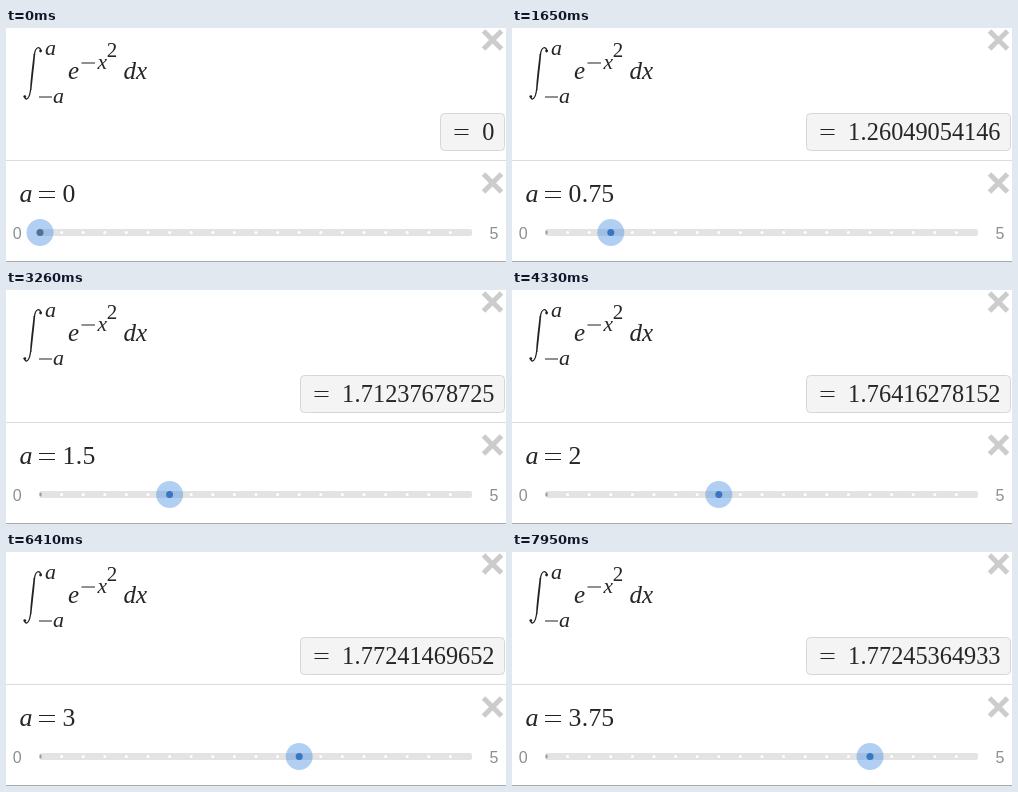
Write an HTML page that moves like this. It is 500 px wide and 234 px high and loops after 8 s.

```html
<!DOCTYPE html>
<html lang="en">
<head>
<meta charset="utf-8">
<title>Integral with slider</title>
<style>
html, body { margin: 0; width: 100%; height: 100%; overflow: hidden; background: #fff; }
svg { display: block; width: 500px; height: 234px; }
.math { font-family: "Liberation Serif", "Times New Roman", serif; fill: #262626; }
.var { font-style: italic; }
.end { font: 16px "Liberation Sans", Arial, sans-serif; fill: #8c8f92; }
.rule { stroke: #222; stroke-width: 1.2; fill: none; }
.close { stroke: #ccc; stroke-width: 5; }
</style>
</head>
<body>
<svg viewBox="0 0 500 234">
  <path d="M0 132.5H500" stroke="#dcdcdc"/>
  <path d="M0 233.5H500" stroke="#aaa"/>
  <path class="close" d="M477.5 3L495.5 21M495.5 3L477.5 21M477.5 146L495.5 164M495.5 146L477.5 164"/>

  <!-- integral sign -->
  <g transform="translate(0 1)">
    <path fill="none" stroke="#222" stroke-width="1.3" d="M35 22C34 17 29.5 17 28.3 26M24.7 60C23.5 70 20 72.5 18.3 67.5"/>
    <path fill="#222" d="M27.6 25L29.2 25Q28.5 34 27.3 44Q26.2 54 25.4 61L24 61Q24.4 53 25.4 44Q26.6 34 27.6 25Z"/>
    <circle cx="34.6" cy="22" r="1.4" fill="#222"/>
    <circle cx="18.8" cy="67.6" r="1.4" fill="#222"/>
  </g>

  <g class="math var">
    <text x="39" y="27" font-size="22">a</text>
    <text x="47" y="75" font-size="22">a</text>
    <text x="62" y="51" font-size="25">e</text>
    <text x="91.5" y="40.5" font-size="21.5">x</text>
    <text x="117.5" y="51" font-size="25">dx</text>
    <text x="13.5" y="174" font-size="26">a</text>
  </g>
  <text class="math" x="100.7" y="28.5" font-size="21">2</text>
  <path class="rule" d="M75.5 35H89M33 69H46M33 163.5H49M33 169.5H49"/>
  <text class="math" id="value" x="56.5" y="174" font-size="25.7"></text>

  <rect id="box" y="85.5" height="37" rx="4" fill="#f4f4f4" stroke="#d6d6d6"/>
  <path class="rule" id="equals" d="M14 101.5H28M14 106.5H28"/>
  <text class="math" id="result" x="488.5" y="112" font-size="24.3" text-anchor="end"></text>

  <text class="end" x="6.8" y="211">0</text>
  <text class="end" x="483.5" y="211">5</text>
  <rect x="33.5" y="201" width="432.5" height="7" rx="2" fill="#e3e3e3"/>
  <g id="ticks" fill="#fff"></g>
  <rect x="33.5" y="202.5" width="2" height="4" rx="1" fill="#999"/>
  <g id="thumb">
    <circle r="13.5" cy="204.5" fill="#468ce1" fill-opacity=".42"/>
    <circle id="dot" r="3.5" cy="204.5"/>
  </g>
</svg>
<script>
const LOOP = 8000, STEP = 0.25, LEFT = 34, UNIT = 86.4, EM = 24.3;
// time of each step; a second entry means the result follows the slider
const steps = [[0], [620], [1120, 1150], [1650], [2160, 2190], [2720],
  [3230, 3260], [3760, 3790], [4300, 4330], [4830], [5340],
  [5840, 5870], [6380, 6410], [6900, 6930], [7440], [7950]];
const $ = id => document.getElementById(id);

for (let i = 1; i < 20; i++) {
  const tick = document.createElementNS("http://www.w3.org/2000/svg", "circle");
  tick.setAttribute("cx", LEFT + i * STEP * UNIT);
  tick.setAttribute("cy", 204.5);
  tick.setAttribute("r", 1.5);
  $("ticks").append(tick);
}

// Simpson's rule for exp(-x^2) from -a to a
function integral(a) {
  const n = 2000, h = a / n;
  let sum = 1 + Math.exp(-a * a);
  for (let i = 1; i < n; i++) sum += (i % 2 ? 4 : 2) * Math.exp(-((i * h) ** 2));
  return sum * h * 2 / 3;
}
const results = steps.map((_, i) => String(+integral(i * STEP).toPrecision(12)));

function setNumber(el, text) {
  el.innerHTML = text.replace(/\.(.*)/, '<tspan dx=".35">.</tspan><tspan dx=".35">$1</tspan>');
}

function showSlider(i) {
  const a = i * STEP;
  setNumber($("value"), String(a));
  $("thumb").setAttribute("transform", `translate(${LEFT + a * UNIT} 0)`);
  $("dot").setAttribute("fill", a ? "#3875c2" : "#536f91");
}

function showResult(i) {
  const text = results[i], dotted = text.includes(".");
  const width = (text.length - dotted) * EM / 2 + dotted * 0.278 * EM;
  const x = Math.round(447.5 - width) - 0.5;
  setNumber($("result"), text);
  $("box").setAttribute("x", x);
  $("box").setAttribute("width", 498.5 - x);
  $("equals").setAttribute("transform", `translate(${x} 0)`);
}

let slider = -1, result = -1;
function draw(t) {
  const s = steps.filter(p => t >= p[0]).length - 1;
  const r = steps.filter(p => t >= p[p.length - 1]).length - 1;
  if (s !== slider) showSlider(slider = s);
  if (r !== result) showResult(result = r);
}

const start = performance.now();
function frame() {
  draw((performance.now() - start) % LOOP);
  requestAnimationFrame(frame);
}
frame();
</script>
</body>
</html>
```
